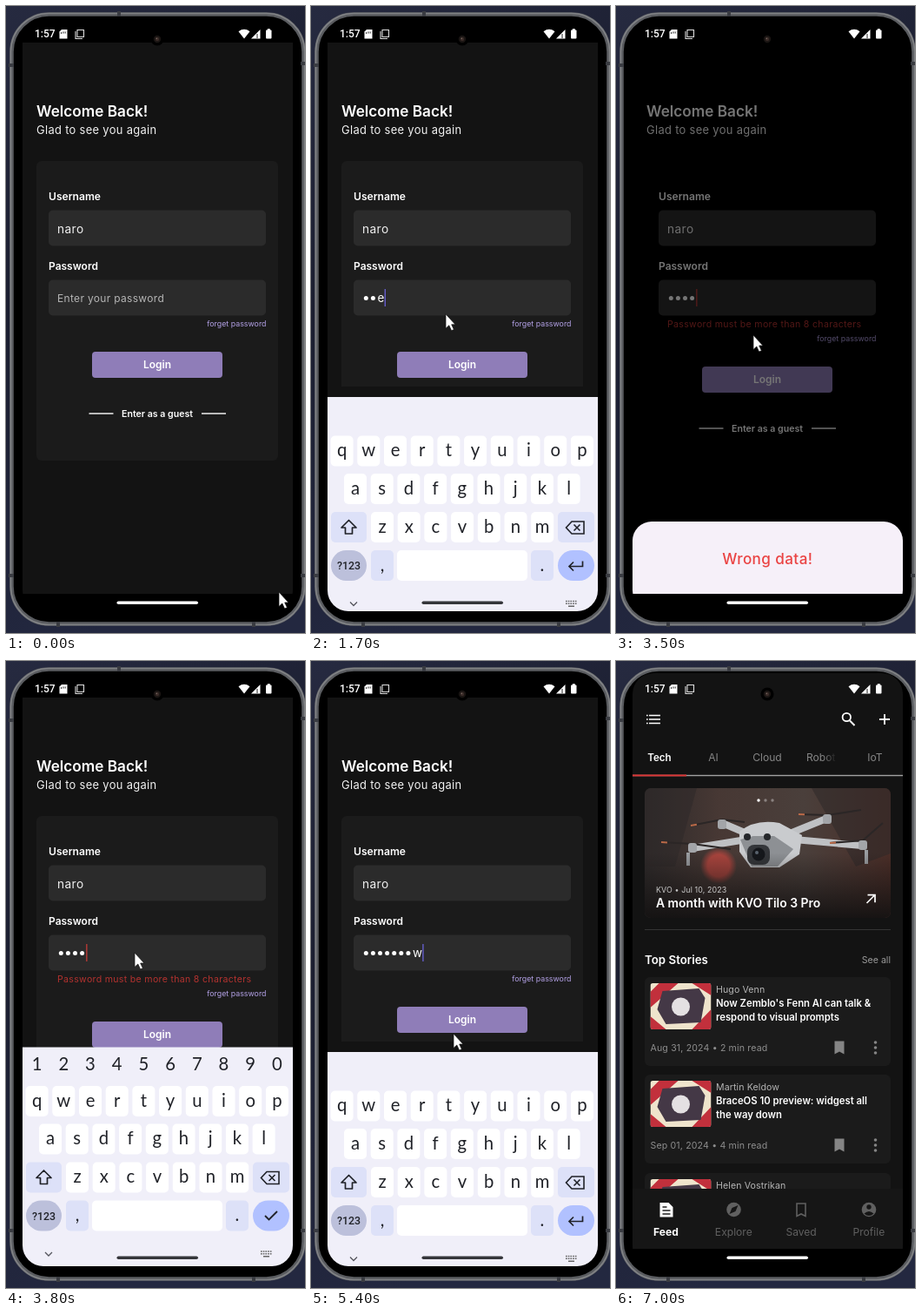
An HTML page for the animation above (7.1 s loop, 344x720 px).

```html
<!DOCTYPE html>
<html lang="en">
<head>
<meta charset="utf-8">
<title>Login flow</title>
<style>
html, body { margin: 0; width: 100%; height: 100%; overflow: hidden; background: #20243a; }
svg { display: block; width: 344px; height: 720px; font-family: Inter, sans-serif; }
.sys { font-family: Roboto, sans-serif; }
.key { font-family: Lato, sans-serif; }
</style>
</head>
<body>
<svg id="stage" viewBox="0 0 344 720"></svg>
<script>
const LOOP = 7100, STEP = 100;
const BG = '#131313', CARD = '#1b1b1b';

// Drawing helpers
const rect = (x, y, w, h, fill, r = 0, more = '') =>
  `<rect x="${x}" y="${y}" width="${w}" height="${h}" rx="${r}" fill="${fill}" ${more}/>`;
const dot = (x, y, r, fill, more = '') => `<circle cx="${x}" cy="${y}" r="${r}" fill="${fill}" ${more}/>`;
const line = (d, color, w = 1.5, more = '') =>
  `<path d="${d}" fill="none" stroke="${color}" stroke-width="${w}" ${more}/>`;
const shape = (d, fill, more = '') => `<path d="${d}" fill="${fill}" ${more}/>`;
const text = (x, y, size, str, { fill = '#fff', weight = 400, gap = 0, anchor = 'start', cls = '', id = '' } = {}) =>
  `<text id="${id}" x="${x}" y="${y}" font-size="${size}" font-weight="${weight}" fill="${fill}" letter-spacing="${gap}"
    text-anchor="${anchor}" class="${cls}">${str.replace('&', '&amp;')}</text>`;
const group = (id, body, more = '') => `<g id="${id}" ${more}>${body}</g>`;
const bold = { weight: 600 };
const mid = { anchor: 'middle' };

const defs = `<defs>
  <linearGradient id="desk" x2="0.3" y2="1"><stop stop-color="#262a40"/><stop offset=".45" stop-color="#1b1e30"/>
    <stop offset="1" stop-color="#232840"/></linearGradient>
  <linearGradient id="hero"><stop stop-color="#2e2a2a"/><stop offset=".3" stop-color="#473834"/>
    <stop offset=".65" stop-color="#4a3f3b"/><stop offset="1" stop-color="#4a2d27"/></linearGradient>
  <radialGradient id="ball"><stop offset=".6" stop-color="#a8443d"/>
    <stop offset="1" stop-color="#a8443d" stop-opacity="0"/></radialGradient>
  <linearGradient id="shade" x2="0" y2="1"><stop offset=".5" stop-color="#141212" stop-opacity="0"/>
    <stop offset="1" stop-color="#141212" stop-opacity=".95"/></linearGradient>
  <linearGradient id="fade" gradientUnits="userSpaceOnUse" x1="238" x2="254"><stop stop-color="#858585"/>
    <stop offset="1" stop-color="#858585" stop-opacity="0"/></linearGradient>
  <clipPath id="screen"><rect x="19" y="14" width="311" height="681" rx="24"/></clipPath>
  <clipPath id="app"><rect x="19" y="42" width="311" height="633"/></clipPath>
  <clipPath id="pageClip"><rect id="pageRect" x="19" y="42" width="311" height="633"/></clipPath>
  <clipPath id="feedClip"><rect x="19" y="320" width="311" height="286"/></clipPath>
  <clipPath id="heroClip"><rect x="33" y="146" width="283" height="149" rx="7"/></clipPath>
  <clipPath id="thumb"><rect width="70" height="53" rx="3"/></clipPath>
</defs>`;

const phone = () => {
  const bands = [[3, 66, 6, 4], [3, 652, 6, 4], [339, 64, 6, 4], [339, 652, 6, 4],
    [128, 6, 4, 6], [58, 707, 4, 6], [283, 707, 4, 6]];
  return rect(0, 0, 344, 720, 'url(#desk)') +
    rect(6.5, 9.5, 336, 700, '#000', 43, 'stroke="#5a5c60" stroke-width="4.6"') +
    rect(5.5, 8.5, 338, 702, 'none', 44, 'stroke="#808285" stroke-width="1.6"') +
    bands.map(b => rect(...b, '#3a3c42')).join('');
};

const statusBar = () =>
  text(33, 36, 12, '1:57', { weight: 500, cls: 'sys' }) +
  shape('M64 27h6.5v10.5h-9v-8z', '#fff') +
  line('M63.7 30v2M66 29.5v2M68.2 29.5v2', '#111', .9) +
  line('M82 27.5h7.5v8h-7.5zM80 29v8.5h8', '#ddd', 1.1) +
  shape('M267.5 29.2Q274 24.5 280.5 29.2L274 37.5z', '#fff') +
  shape('M292.5 27v10.5h-10.5z', '#fff') + line('M289 32v5', '#222', 1) +
  rect(299, 27.5, 6.5, 10, '#fff', 1) + rect(300.8, 26.2, 3, 2, '#fff') +
  dot(174, 38, 7.5, '#000') + dot(174, 38, 4.2, '#1a1513') +
  dot(174, 38, 2.2, '#3a2c28') + dot(173.3, 37.3, .8, '#776860');

const login = () => group('page',
  rect(35, 178, 278, 344, CARD, 6, 'id="card"') +
  text(35, 127, 17.2, 'Welcome Back!', bold) +
  text(35, 147, 12.9, 'Glad to see you again', { gap: .33, fill: '#f2f2f2' }) +
  text(49, 223, 12.1, 'Username', bold) + rect(49, 234.5, 250, 41, '#2b2b2b', 5) +
  text(59, 260.5, 13.7, 'naro', { gap: .4, fill: '#f0f0f0' }) +
  text(49, 302.5, 12, 'Password', bold) + rect(49, 314.5, 250, 41, '#2b2b2b', 5) +
  group('hint', text(59, 340, 12, 'Enter your password', { gap: .32, fill: '#b5b5b5' })) +
  group('dots', Array.from({ length: 8 }, (_, i) => dot(63.3 + 8.1 * i, 335.5, 2.5, '#fff')).join('')) +
  text(117, 340, 13.4, 'w', { id: 'last' }) +
  rect(0, 325, 1.3, 20, '#6a62d8', 0, 'id="caret"') +
  group('error', text(59, 369, 10.6, 'Password must be more than 8 characters', { fill: '#b3322f', gap: .3 })) +
  group('lower',
    text(299.5, 367.5, 8.85, 'forget password', { fill: '#b3a1e6', anchor: 'end' }) +
    rect(99, 397, 150, 30, '#8f7db8', 4) +
    text(174, 416.2, 12, 'Login', { ...bold, ...mid }) +
    text(174, 472, 10.6, 'Enter as a guest', { ...bold, ...mid }) +
    line('M95.5 468h28M225 468h28', '#eee', 1.4)),
  'clip-path="url(#pageClip)"');

const sheet = () => rect(19, 42, 311, 633, '#000', 0, 'id="scrim"') +
  group('sheet', rect(19, 592, 311, 120, '#f6f0f9', 22) +
    text(174.3, 641, 17.1, 'Wrong data!', { ...mid, fill: '#ea4343', weight: 500, gap: .4 }));

const drone = () => {
  const arms = 'M150 205L88 215M155 200L122 186M205 205L283 212M200 198L242 181';
  const blades = [[88, 209, 'M52 208L88 210L132 216'], [122, 182, 'M86 189L122 182L148 185'],
    [243, 176, 'M210 176L243 177L282 171'], [284, 206, 'M246 209L284 206L307 186']];
  return rect(33, 146, 283, 149, 'url(#hero)') +
    shape('M33 146h60l-25 90h-35zM225 146h91v75l-40 15z', '#2f2928', 'opacity=".55"') +
    dot(118, 235, 21, 'url(#ball)') +
    line(arms, '#bfc1c4', 8, 'stroke-linecap="round"') +
    blades.map(([x, y, d]) => line(d, '#2b2626', 2.2) +
      line(d, '#bb6a48', 2, 'stroke-dasharray="7 200"') + rect(x - 5, y, 10, 11, '#a3a5a9', 3)).join('') +
    shape('M142 196Q160 181 188 186L214 200L211 222L188 237H155L142 219z', '#c9cbce') +
    shape('M143 205L158 201H182L204 216L186 236H156z', '#8d9094') +
    rect(151, 211, 26, 23, '#34363a', 8) + dot(164, 222, 7.5, '#15171b') + dot(162, 220, 2, '#59636d') +
    dot(151, 202, 4, '#25272b') + dot(174, 202, 4, '#25272b') +
    line('M83 220v15M288 217v16', '#9a9da1', 4) +
    rect(33, 146, 283, 149, 'url(#shade)');
};

const thumbnail = () => `<g clip-path="url(#thumb)">` + rect(0, 0, 70, 53, '#efe4cc') +
  shape('M10 0h22L0 28V10zM48 0h22v14zM0 38l18 15H0zM70 30v23H48z', '#c2303c') +
  shape('M14 9L56 6L63 17L58 45L18 47L8 30z', '#443846') + dot(35, 27, 10.5, '#e4e0e2') + '</g>';

const story = (y, author, titles, date) =>
  `<g transform="translate(33 ${y})">` + rect(0, 0, 283, 102, CARD, 6) +
  `<g transform="translate(6.5 7)">${thumbnail()}</g>` +
  text(82, 18.2, 10.6, author, { fill: '#b5b5b5', gap: .1 }) +
  titles.map((s, i) => text(82, 34 + 16 * i, 11.3, s, bold)).join('') +
  text(6.5, 85, 10.6, date, { fill: '#8d8d8d', gap: .15 }) +
  shape('M218.5 73.5h11v15l-5.5-3l-5.5 3z', '#858585') +
  [75, 81, 87].map(cy => dot(265.5, cy, 1.8, '#858585')).join('') + '</g>';

const home = () => group('home',
  rect(19, 14, 311, 661, BG) +
  line('M38 62.5h13M38 67h13M38 71.5h13', '#fff', 1.7) + line('M35 62.5h1.7M35 67h1.7M35 71.5h1.7', '#fff', 1.7) +
  line('M269 68.5l5.5 5.5', '#fff', 2) + dot(265.3, 64.5, 4.7, 'none', 'stroke="#fff" stroke-width="1.8"') +
  line('M303 67h12M309 61v12', '#fff', 1.8) +
  text(50, 115, 11.6, 'Tech', { ...bold, ...mid }) +
  [['AI', 112], ['Cloud', 174], ['IoT', 298]].map(([s, x]) =>
    text(x, 115, 12.1, s, { ...mid, fill: '#858585' })).join('') +
  text(219, 115, 12.1, 'Robot', { fill: 'url(#fade)' }) +
  rect(19, 130.8, 311, 1.4, '#a2a2a2') + rect(19, 130.4, 62, 2, '#d93636') +
  `<g clip-path="url(#heroClip)">${drone()}</g>` +
  [164, 172, 180].map((x, i) => dot(x, 160, 1.7, i ? '#8a8280' : '#fff')).join('') +
  text(46, 265.5, 8.9, 'KVO • Jul 10, 2023', { fill: '#c9c9c9', gap: .1 }) +
  text(46, 283, 13.9, 'A month with KVO Tilo 3 Pro', bold) +
  line('M288.5 278l9-9M289.5 268.7h8.5v8.5', '#fff', 1.7) +
  rect(33, 308, 283, 1, '#343434') +
  text(33, 347.5, 13.3, 'Top Stories', bold) + text(316, 346.5, 10.6, 'See all', { fill: '#9a9a9a', anchor: 'end' }) +
  '<g clip-path="url(#feedClip)">' +
  story(363, 'Hugo Venn', ["Now Zemblo's Fenn AI can talk &", 'respond to visual prompts'], 'Aug 31, 2024 • 2 min read') +
  story(475, 'Martin Keldow', ['BraceOS 10 preview: widgest all', 'the way down'], 'Sep 01, 2024 • 4 min read') +
  story(588, 'Helen Vostrikan', [], '') + '</g>' +
  rect(19, 606, 311, 69, '#161616') +
  shape('M50.5 622h10l5 5v11.5h-15z', '#fff') + line('M53.5 627h5M53.5 631h9M53.5 635h9', '#222', 1.4) +
  dot(135.5, 630, 8.3, '#606060') + shape('M140.5 625l-3 7l-7 3l3-7z', '#161616') +
  line('M208 623h10v14.5l-5-2.5l-5 2.5z', '#606060', 1.6) +
  dot(291, 630, 8.3, '#606060') + dot(291, 627, 2.7, '#161616') + shape('M285.5 634.5q5.5-5 11 0q-5.5 5-11 0z', '#161616') +
  ['Feed', 'Explore', 'Saved', 'Profile'].map((s, i) => text(57.5 + 77.8 * i, 660, 12.1, s,
    { ...mid, weight: i ? 400 : 700, fill: i ? '#606060' : '#fff' })).join(''));

const keyboard = () => {
  const PITCH = 30.7, INK = '#202228', TINT = '#dde1f8';
  const glyph = (x, y, label) => text(x, y, 20.3, label, { ...mid, fill: INK, cls: 'key' });
  const key = (x, y, w, label, fill = '#fff') => rect(x - w / 2, y - 17.5, w, 35, fill, 5) + glyph(x, y + 6, label);
  const row = (chars, x, y) => [...chars].map((c, i) => key(x + PITCH * i, y, 26, c)).join('');
  return group('keyboard', rect(19, 449, 311, 270, '#f0eff9') +
    group('numbers', [...'1234567890'].map((c, i) => glyph(35.6 + PITCH * i, 475.5, c)).join('')) +
    row('qwertyuiop', 35.6, 511) + row('asdfghjkl', 51, 554.5) + row('zxcvbnm', 82, 598.5) +
    rect(23, 581, 41, 35, TINT, 5) + rect(284, 581, 42, 35, TINT, 5) +
    line('M43.5 590.5l-8.5 8.5h4.5v7h8v-7h4.5z', INK, 1.7, 'stroke-linejoin="round"') +
    line('M300 592h14v14h-14l-6.5-7zM302.5 595.5l7 7M309.5 595.5l-7 7', INK, 1.6) +
    rect(23, 625, 41, 35, '#bcc0db', 17.5) +
    text(43.5, 647, 12.4, '?123', { ...mid, fill: INK, weight: 500, cls: 'sys' }) +
    key(82, 642.5, 26, ',', TINT) + rect(99, 625, 150, 35, '#fff', 5) + key(266, 642.5, 26, '.', TINT) +
    rect(284, 625, 42, 35, '#b1c1ff', 17.5) +
    group('enter', line('M312.5 637.5v6h-15M302 638.5l-5 5l5 5', INK, 1.7)) +
    group('check', line('M298 642.5l4.5 4.5l9.5-9.5', INK, 1.8)) +
    line('M45 684.5l4 4l4-4', '#55565e', 1.3) +
    line('M293 683.5h13M293 686.3h13', '#666', 1.5, 'stroke-dasharray="1.7 1"') + line('M296 689.2h7', '#666', 1.5));
};

const stage = document.getElementById('stage');
stage.innerHTML = defs + phone() + '<g clip-path="url(#screen)">' +
  '<g clip-path="url(#app)">' + rect(19, 42, 311, 633, BG, 0, 'id="backdrop"') + login() + sheet() + '</g>' +
  home() + keyboard() + '</g>' + statusBar() +
  rect(127.5, 683.5, 93.5, 3.6, '#fff', 1.8, 'id="pill"') +
  shape('M0 0V16.5L3.8 13L6.6 19L9.4 17.8L6.7 12H11z', '#fff', 'id="cursor" stroke="#111" stroke-width=".7"');

// Motion tables: [time, value, ...]
const CURSOR = [[0, 314, 673], [300, 260, 540], [600, 165, 350], [800, 156, 338], [900, 155, 352], [1800, 155, 354],
  [2100, 150, 412], [2200, 145, 412], [2400, 73, 408], [2700, 80, 405], [3200, 156, 380], [3500, 158, 378], [3800, 148, 335],
  [4200, 152, 352], [5100, 152, 354], [5400, 164, 428], [5500, 166, 412], [5900, 166, 414],
  [6300, 155, 580], [6600, 152, 673], [6700, 158, 695], [6800, 165, 722]];
const KEYBOARD = [[700, 260], [800, 190], [900, 77], [1000, 0], [2400, 0], [2500, 60], [2600, 170], [2700, 260],
  [3500, 260], [3600, 180], [3700, 60], [3800, 0], [5500, 0], [5600, 70], [5700, 190], [5800, 260]];
const SHEET = [[2200, 90], [2500, 0], [3500, 0], [3700, 90]];
const DIM = [[2100, 0], [2300, 1], [3500, 1], [3700, 0]];
const HOME = [[5700, 0], [6000, 1]];
const KEYS = [1300, 1500, 1700, 1900, 4200, 4400, 4700, 5100];
const TAPS = [800, 3500, ...KEYS];
const TYPED = 'qwerqwew';

function at(table, t) {
  const next = table.findIndex(p => p[0] > t);
  if (next === 0) return table[0].slice(1);
  if (next < 0) return table.at(-1).slice(1);
  const [a, b] = [table[next - 1], table[next]];
  const k = (t - a[0]) / (b[0] - a[0]);
  return a.slice(1).map((v, i) => v + (b[i + 1] - v) * k);
}

const el = id => document.getElementById(id);
const show = (id, on) => el(id).setAttribute('display', on ? 'inline' : 'none');
const move = (id, x, y) => el(id).setAttribute('transform', `translate(${x} ${y})`);
const set = (id, name, value) => el(id).setAttribute(name, value);

function drawPassword(t, failed) {
  const count = KEYS.filter(k => k <= t).length;
  const plain = count > 0 && (count < 8 ? t - KEYS[count - 1] < 500 : t < 5600);
  const hidden = plain ? count - 1 : count;
  const end = 60.3 + 8.1 * hidden;
  [...el('dots').children].forEach((d, i) => d.setAttribute('display', i < hidden ? 'inline' : 'none'));
  show('hint', !count);
  show('last', plain);
  el('last').textContent = TYPED[count - 1] || '';
  set('last', 'x', end);
  const lastTap = Math.max(...TAPS.filter(k => k <= t), -1);
  show('caret', lastTap >= 0 && (t - lastTap) % 1000 < 500);
  set('caret', 'x', end - .5 + (plain ? el('last').getComputedTextLength() + .8 : 0));
  set('caret', 'fill', failed ? '#c23b37' : '#6a62d8');
}

function draw(t) {
  const failed = t >= 2100 && t < 5100;
  const numeric = t < 1300 || (t >= 3000 && t < 4200);
  const [offset] = at(KEYBOARD, t);
  const [dim] = at(DIM, t);
  const [shown] = at(HOME, t);
  const open = offset === 0;
  drawPassword(t, failed);
  show('error', failed);
  move('lower', 0, failed ? 17 : 0);
  set('card', 'height', failed ? 361 : 344);
  set('pageRect', 'height', open && !numeric ? 395 : 633);
  set('scrim', 'opacity', .54 * dim);
  // Dimmed surfaces sink to full black
  set('card', 'opacity', 1 - dim);
  set('backdrop', 'opacity', 1 - dim);
  move('sheet', 0, at(SHEET, t)[0]);
  move('keyboard', 0, offset - (numeric ? 5.5 : 0));
  show('keyboard', offset < 260);
  show('numbers', numeric);
  show('check', numeric);
  show('enter', !numeric);
  set('home', 'opacity', shown);
  move('home', 0, 20 * (1 - shown));
  set('pill', 'fill', open ? '#34353a' : '#fff');
  move('cursor', ...at(CURSOR, t));
}

const start = performance.now();
function tick() {
  const t = (performance.now() - start) % LOOP;
  draw(t - t % STEP);
  requestAnimationFrame(tick);
}
tick();
</script>
</body>
</html>
```
